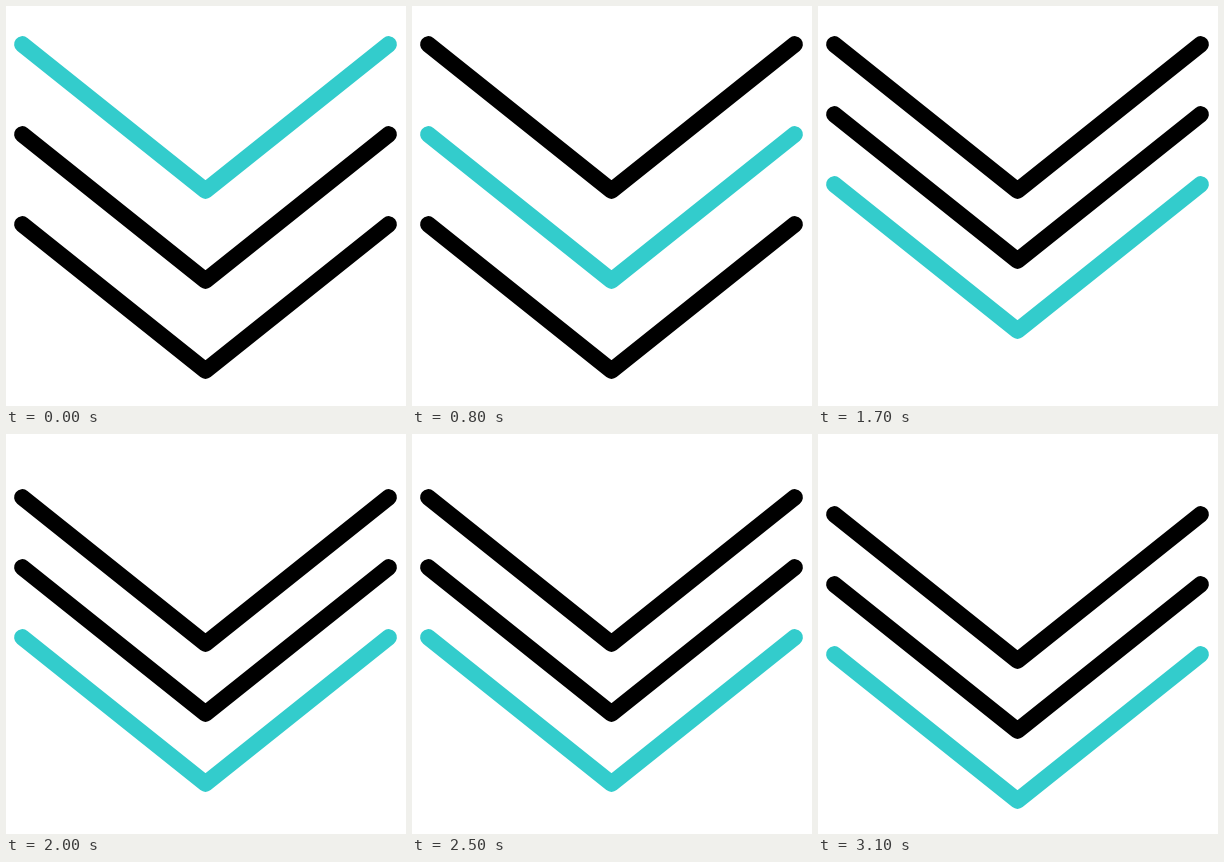
An HTML page with a canvas for the animation above (3200 ms loop, 400 by 400 pixels).

```html
<!DOCTYPE html>
<html lang="en">
<head>
<meta charset="utf-8">
<title>Chevrons</title>
<style>
  html, body { margin: 0; width: 100%; height: 100%; overflow: hidden; background: #fff; }
  canvas { display: block; }
</style>
</head>
<body>
<canvas id="stage" width="400" height="400"></canvas>
<script>
const ctx = document.getElementById('stage').getContext('2d');
const LOOP = 3200, STEP = 100;
const TEAL = '#33cccc', BLACK = '#000';

// Linear interpolation through [step, value] keys, held outside them.
function tween(keys, step) {
  if (step <= keys[0][0]) return keys[0][1];
  for (let i = 1; i < keys.length; i++) {
    const [s0, v0] = keys[i - 1], [s1, v1] = keys[i];
    if (step <= s1) return v0 + (v1 - v0) * (step - s0) / (s1 - s0);
  }
  return keys[keys.length - 1][1];
}

const gapKeys = [[11, 90], [17, 70]];
const dropKeys = [[17, 0], [23, 50], [27, 0], [31, 42]];

function chevron(y, color) {
  ctx.strokeStyle = color;
  ctx.beginPath();
  ctx.moveTo(16.3, y);
  ctx.lineTo(199.5, y + 146.4);
  ctx.lineTo(382.7, y);
  ctx.stroke();
}

function draw(time) {
  const step = Math.floor((time % LOOP) / STEP);
  const gap = tween(gapKeys, step);
  const drop = tween(dropKeys, step);
  const lit = step < 12 ? Math.floor(step / 2) % 3 : 2;

  ctx.fillStyle = '#fff';
  ctx.fillRect(0, 0, 400, 400);
  ctx.lineWidth = 16.4;
  ctx.lineCap = ctx.lineJoin = 'round';
  for (let i = 0; i < 3; i++) {
    chevron(38.3 + Math.round(drop + i * gap), i === lit ? TEAL : BLACK);
  }
}

const start = performance.now();
function tick() {
  draw(performance.now() - start);
  requestAnimationFrame(tick);
}
tick();
</script>
</body>
</html>
```
